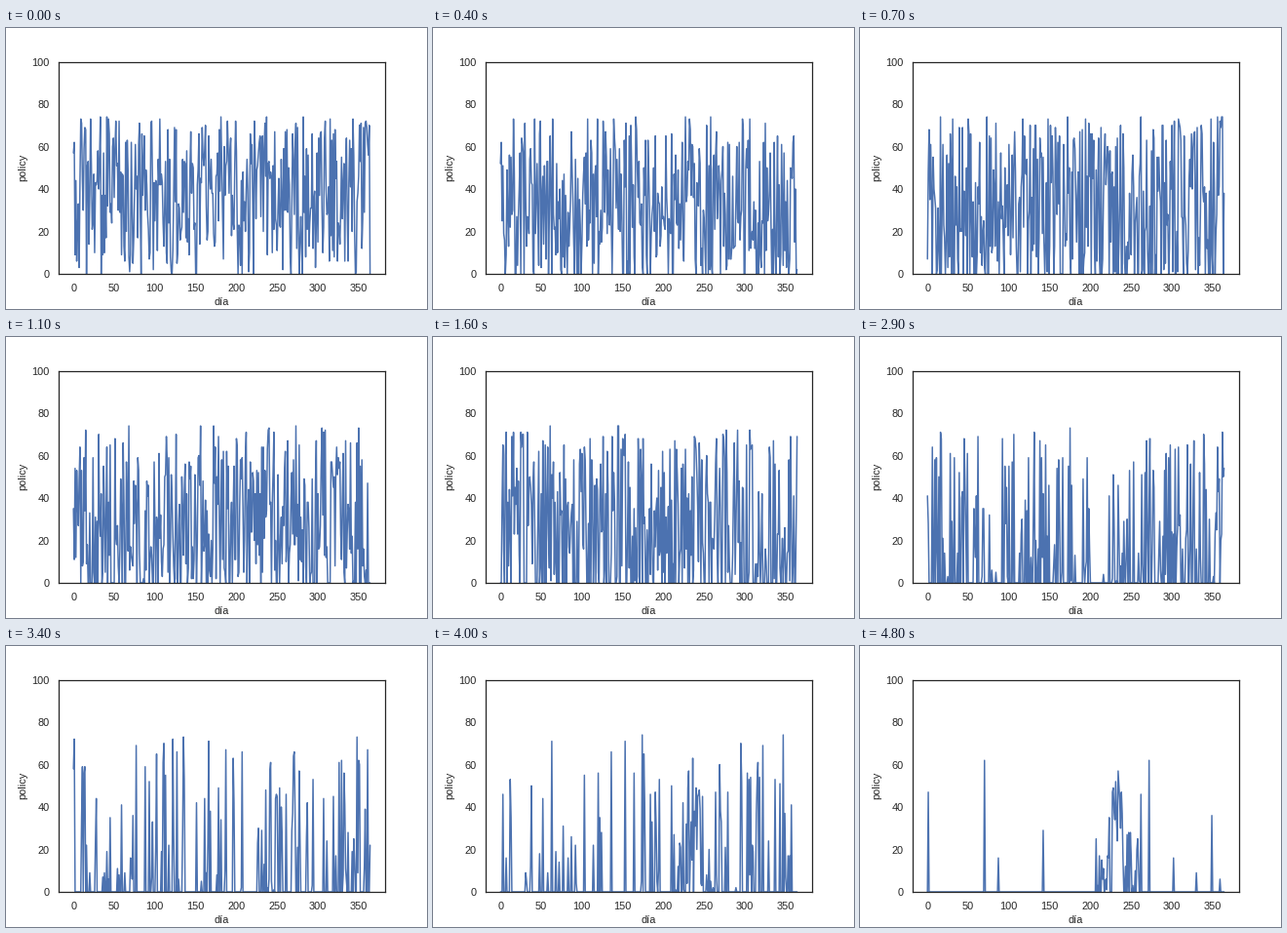
A matplotlib script that plays this animation: 432 by 288 pixels, repeating every 4.9 s.

```python
import numpy as np
import matplotlib.pyplot as plt
from matplotlib.animation import FuncAnimation

FRAMES = 49
STEP_MS = 100
DAYS = np.arange(365)
PEAK_DAY = 235
TOP = 74
INK = "0.15"


def bell(width, power):
    return np.exp(-np.abs((DAYS - PEAK_DAY) / width) ** power)


def policy(i):
    """Random daily values that thin out, leaving a cluster near PEAK_DAY."""
    rng = np.random.default_rng(100 + i)
    done = i / (FRAMES - 1)
    season, core = bell(26, 6), bell(14, 2)
    active = np.maximum(0.96 - 0.92 * done, 0.8 * season * done)
    values = rng.integers(0, TOP + 1, DAYS.size)
    values = values * (1 - done ** 2 * season * (0.85 - 0.7 * core))
    return np.where(rng.random(DAYS.size) < active, np.round(values), 0)


plt.rcParams.update({
    "font.family": "Liberation Sans",
    "axes.labelsize": 11,
    "xtick.labelsize": 11,
    "ytick.labelsize": 11,
    "axes.linewidth": 1.25,
    "axes.edgecolor": INK,
    "axes.labelcolor": INK,
})

fig = plt.figure(figsize=(6, 4), dpi=72, facecolor="white")
ax = fig.add_axes([0.125, 0.125, 0.775, 0.755])
ax.tick_params(length=0, pad=9.5, labelcolor=INK)
line, = ax.plot(DAYS, policy(0), color="#4C72B0", lw=1.5,
                solid_capstyle="round")
ax.set_ylim(0, 100)
ax.set_xlabel("día")
ax.set_ylabel("policy")


def draw(i):
    line.set_ydata(policy(i))
    return line,


anim = FuncAnimation(fig, draw, frames=FRAMES, interval=STEP_MS,
                     repeat=True, repeat_delay=0, blit=False)
plt.show()
```
